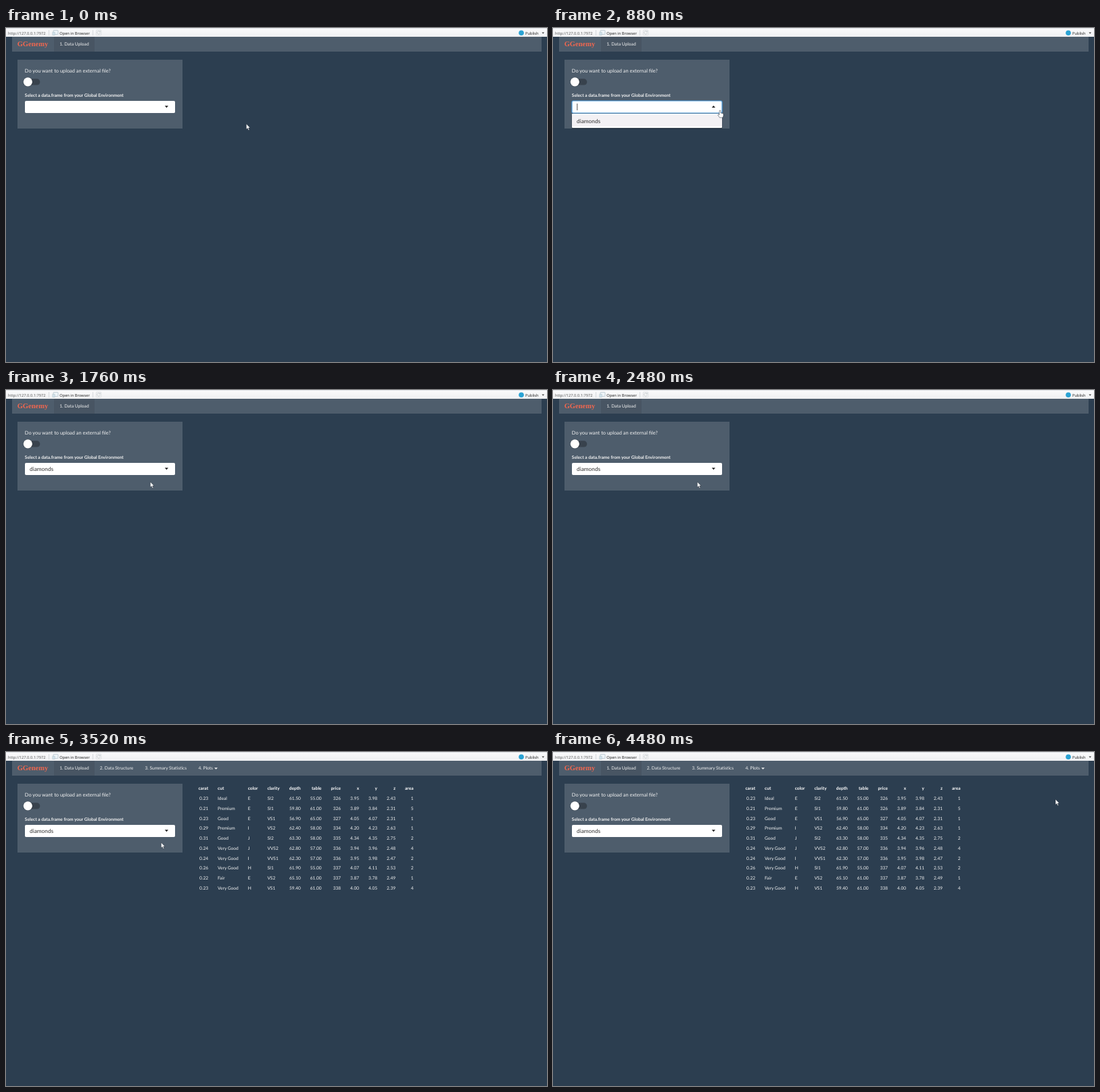
Animation of 800x495 px, one loop 4520 ms. Source, as an HTML page:

```html
<!DOCTYPE html>
<html lang="en">
<head>
<meta charset="utf-8">
<title>Data upload</title>
<style>
  html, body { margin: 0; width: 100%; height: 100%; overflow: hidden; background: #2c3e50; }
  body { font: 6.6px Lato, sans-serif; text-rendering: geometricPrecision; }
  svg { position: absolute; left: 0; top: 0; width: 800px; height: 495px; }
  text { fill: #f2f2f2; }
  .bar text { font: 5.72px "Open Sans", sans-serif; fill: #222; }
  .brand { font: bold 10.5px "Liberation Serif", serif; fill: #f0674f; }
  .question { font-size: 7.42px; }
  .label { font-weight: bold; }
  .value { font-size: 8.3px; fill: #333; }

  #table {
    position: absolute; left: 284.4px; top: 45.7px; width: 318.3px;
    display: grid; grid-template: 16.3px / repeat(11, auto); grid-auto-rows: 14.71px;
    justify-content: space-between; align-items: center;
    color: #f4f4f4; white-space: nowrap;
  }
  #table span { text-align: right; }
  #table span:nth-child(-n + 11) { font-weight: bold; color: #fff; }
  #table span:nth-child(11n + 2), #table span:nth-child(11n + 3), #table span:nth-child(11n + 4) { text-align: left; }
</style>
</head>
<body>
<svg viewBox="0 0 800 495">
  <defs>
    <linearGradient id="chrome" x2="0" y2="1">
      <stop stop-color="#fbfbfc"/><stop offset="1" stop-color="#eff0f2"/>
    </linearGradient>
  </defs>

  <g class="bar">
    <rect width="800" height="13" fill="url(#chrome)"/>
    <rect width="800" height="1" fill="#e0e3e7"/>
    <text x="3" y="9.5" style="fill:#555">http://127.0.0.1:7972</text>
    <path d="M63.5 3V11M128.5 3V11" stroke="#cfd2d6" stroke-width=".8"/>
    <rect x="70" y="3.4" width="7" height="6" rx=".6" fill="#eef4f8" stroke="#aebdc8" stroke-width=".7"/>
    <path d="M68.8 10.6V6.2H72.2V10.6Z" fill="#d3e3ec" stroke="#a9bac5" stroke-width=".5"/>
    <text x="79.2" y="9.6">Open in Browser</text>
    <rect x="133.4" y="3" width="7.4" height="7.6" rx="1" fill="#f4f5f6" stroke="#d2d5d8" stroke-width=".6"/>
    <path d="M139 5.6A2.3 2.3 0 1 0 139.3 7.4M139.3 4.2V5.9H137.6" fill="none" stroke="#c3c8cc" stroke-width=".8"/>
    <circle cx="762" cy="7.2" r="3.8" fill="#2ba3d4"/>
    <text x="768" y="9.6">Publish</text>
    <path d="M792.4 6.4H796L794.2 8.4Z" fill="#333"/>
  </g>

  <rect x="9" y="13" width="783" height="22" fill="#4e5d6c"/>
  <rect x="71" y="13" width="60" height="22" fill="#485563"/>
  <text class="brand" x="16.7" y="27.4">GGenemy</text>
  <text x="79.3" y="26.2">1. Data Upload</text>

  <rect x="17" y="47" width="244" height="102" fill="#4e5d6c"/>
  <text class="question" x="27.8" y="65.8">Do you want to upload an external file?</text>
  <rect x="30" y="75.3" width="20.3" height="9.2" rx="4.6" fill="#38424d"/>
  <circle cx="32.3" cy="79.9" r="7.2" fill="#000" opacity=".2"/>
  <circle cx="32.3" cy="79.8" r="6.6" fill="#fff"/>
  <text class="label" x="27.8" y="102.4">Select a data.frame from your Global Environment</text>

  <rect id="box" x="28" y="108" width="222" height="18" rx="1.8" fill="#fff"/>
  <g id="closed">
    <path d="M234.8 115.2H240L237.4 118.2Z" fill="#222"/>
    <text class="value" id="picked" x="35" y="119.9">diamonds</text>
  </g>
  <g id="menu">
    <rect x="28" y="108" width="222" height="18" rx="1.8" fill="none" stroke="#4a9bdc" stroke-width="1.2"/>
    <path d="M234.8 118H240L237.4 115Z" fill="#222"/>
    <path d="M35.8 112V122" stroke="#222" stroke-width=".8"/>
    <rect x="27.6" y="128" width="222.8" height="21.4" rx="1.5" fill="#000" opacity=".25"/>
    <rect x="28" y="127" width="222" height="21" rx="1.2" fill="#fff"/>
    <rect x="28" y="129" width="222" height="17" fill="#f3f1f4"/>
    <text class="value" x="35" y="140.9">diamonds</text>
  </g>

  <g id="tabs">
    <text x="138.8" y="26.2">2. Data Structure</text>
    <text x="205.4" y="26.2">3. Summary Statistics</text>
    <text x="284.4" y="26.2">4. Plots</text>
    <path d="M308 23.2H313L310.5 25.8Z" fill="#f2f2f2"/>
  </g>
</svg>

<div id="table">
carat, cut, color, clarity, depth, table, price, x, y, z, area
0.23, Ideal, E, SI2, 61.50, 55.00, 326, 3.95, 3.98, 2.43, 1
0.21, Premium, E, SI1, 59.80, 61.00, 326, 3.89, 3.84, 2.31, 5
0.23, Good, E, VS1, 56.90, 65.00, 327, 4.05, 4.07, 2.31, 1
0.29, Premium, I, VS2, 62.40, 58.00, 334, 4.20, 4.23, 2.63, 1
0.31, Good, J, SI2, 63.30, 58.00, 335, 4.34, 4.35, 2.75, 2
0.24, Very Good, J, VVS2, 62.80, 57.00, 336, 3.94, 3.96, 2.48, 4
0.24, Very Good, I, VVS1, 62.30, 57.00, 336, 3.95, 3.98, 2.47, 2
0.26, Very Good, H, SI1, 61.90, 55.00, 337, 4.07, 4.11, 2.53, 2
0.22, Fair, E, VS2, 65.10, 61.00, 337, 3.87, 3.78, 2.49, 1
0.23, Very Good, H, VS1, 59.40, 61.00, 338, 4.00, 4.05, 2.39, 4
</div>

<svg viewBox="0 0 800 495">
  <g id="cursor" fill="#fff" stroke="#1d2733" stroke-width=".5" stroke-linejoin="round">
    <path id="pointer" d="M0 0V8.2L1.9 6.5L3.2 9.5L4.6 8.9L3.3 6H5.8Z"/>
    <path id="hand" d="M-1 .6Q0 -.8 1 .6V4Q2 3.4 2.6 4.4Q3.5 3.9 4 4.9Q4.9 4.6 5 5.6V8.2L4 10.8H-.6L-3.1 7.2Q-3.4 5.8 -2 6L-1 6.9Z"/>
  </g>
</svg>

<script>
const LOOP = 4520, TICK = 40;
const OPEN = 800, PICK = 1440, LOAD = 3440;
const byId = id => document.getElementById(id);

// One grid cell per value in the comma-separated text
const cells = byId("table").textContent.trim().split(/,\s*|\n/);
byId("table").replaceChildren(...cells.map(value => {
  const span = document.createElement("span");
  span.textContent = value;
  return span;
}));

const home = { x: 355.3, y: 142 };
const moves = [
  { from: 80, to: 440, x: 247, y: 122 },
  { from: 880, to: 1200, x: 220.5, y: 132 },
  { from: PICK, to: 1640, x: 213.3, y: 136 },
  { from: 3480, to: 3840, x: 681, y: 79 },
  { from: 3840, to: 4080, x: 743, y: 70 }
];

function cursorAt(t) {
  let { x, y } = home;
  for (const m of moves) {
    const u = Math.min(1, Math.max(0, (t - m.from) / (m.to - m.from)));
    const k = u * u * (3 - 2 * u);
    x += (m.x - x) * k;
    y += (m.y - y) * k;
  }
  return { x, y };
}

const show = (id, on) => byId(id).style.display = on ? "" : "none";

function draw(now) {
  const t = Math.floor(now % LOOP / TICK) * TICK;
  const { x, y } = cursorAt(t);
  const open = t >= OPEN && t < PICK;
  const inside = x < 250 && y > 108 && y < (open ? 148 : 126);
  byId("cursor").setAttribute("transform", `translate(${x} ${y})`);
  show("hand", inside);
  show("pointer", !inside);
  show("menu", open);
  show("closed", !open);
  show("picked", t >= PICK);
  show("tabs", t >= LOAD);
  show("table", t >= LOAD);
}

const start = performance.now();
function frame() {
  draw(performance.now() - start);
  requestAnimationFrame(frame);
}
frame();
</script>
</body>
</html>
```
